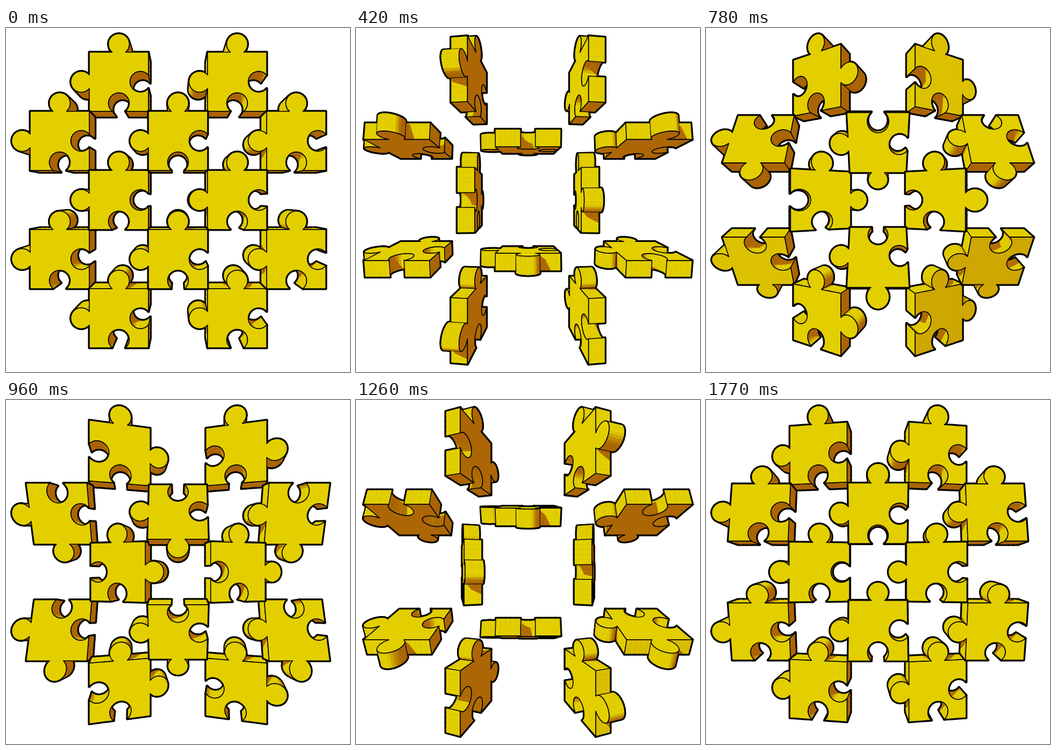
Recreate the animation shown at these times as an HTML page with a canvas. Size 640 by 640 pixels, loop 1.8 s.

```html
<!DOCTYPE html>
<html lang="en">
<head>
<meta charset="utf-8">
<title>Turning puzzle pieces</title>
<style>
html, body { margin: 0; width: 100%; height: 100%; overflow: hidden; background: #fff; }
canvas { display: block; width: 640px; height: 640px; }
</style>
</head>
<body>
<canvas id="stage" width="640" height="640"></canvas>
<script>
const ctx = document.getElementById('stage').getContext('2d');
const LOOP = 1800, STEP = 30;
const CENTER = 320, SPACING = 110;
const HALF = 55, DEPTH = 14.5;            // half side and half thickness
const KNOB = 19.5, KNOB_OUT = 15;         // radius and distance of knob centre from the edge
const FOCUS = 417, EYE = FOCUS + DEPTH;
const LIGHT = [-400, -400, 600];
const DARK = [172, 102, 6], BRIGHT = [227, 207, 0];

// Outline, clockwise from the top left corner: knobs on top and left, sockets right and bottom.
function buildOutline() {
  const points = [];
  const neck = Math.sqrt(KNOB ** 2 - KNOB_OUT ** 2);
  const sweep = Math.PI - Math.atan2(neck, KNOB_OUT);
  const straight = 5, arc = 24;
  [1, -1, -1, 1].forEach((sign, turns) => {
    const add = (u, v, corner) => {
      let x = u, y = -HALF - v;
      for (let i = 0; i < turns; i++) [x, y] = [-y, x];
      points.push({ x, y, corner });
    };
    for (let i = 0; i < straight; i++) add(-HALF + (HALF - neck) * i / straight, 0, i === 0);
    for (let i = 0; i < arc; i++) {
      const a = sweep * (2 * i / arc - 1);
      add(KNOB * Math.sin(a), sign * (KNOB_OUT + KNOB * Math.cos(a)), i === 0);
    }
    for (let i = 0; i < straight; i++) add(neck + (HALF - neck) * i / straight, 0, i === 0);
  });
  return points;
}

const outline = buildOutline();
const walls = outline.map((a, i) => {
  const b = outline[(i + 1) % outline.length];
  const dx = b.x - a.x, dy = b.y - a.y, len = Math.hypot(dx, dy);
  return { a, b, dx, dy, nx: dy / len, ny: -dx / len, mx: (a.x + b.x) / 2, my: (a.y + b.y) / 2 };
});

function buildPieces() {
  const list = [];
  for (let i = 0; i < 3; i++) {
    for (let j = 0; j < 2; j++) {
      const spin = (i + j) % 2 ? -1 : 1;
      const near = (j - 0.5) * 2 * SPACING, far = (i - 1) * 2 * SPACING;
      list.push({ x: near, y: far, upright: true, spin });
      list.push({ x: far, y: near, upright: false, spin });
    }
  }
  return list.sort((p, q) => Math.hypot(q.x, q.y) - Math.hypot(p.x, p.y));
}
const pieces = buildPieces();

const clamp = (v, lo, hi) => Math.min(hi, Math.max(lo, v));

function shade(dot) {
  const k = clamp(dot / 0.46, 0, 1) ** 1.6;
  return `rgb(${DARK.map((d, i) => Math.round(d + (BRIGHT[i] - d) * k))})`;
}

function trace(points) {
  ctx.beginPath();
  points.forEach(p => ctx.lineTo(p[0], p[1]));
  ctx.closePath();
}

function paint(points, color) {
  trace(points);
  ctx.fillStyle = ctx.strokeStyle = color;
  ctx.lineWidth = 0.6;
  ctx.fill();
  ctx.stroke();
}

function line(p, q) {
  ctx.beginPath();
  ctx.moveTo(p[0], p[1]);
  ctx.lineTo(q[0], q[1]);
  ctx.strokeStyle = '#000';
  ctx.lineWidth = 1.5;
  ctx.stroke();
}

// Distance along the flattened light ray to the first part of the outline it meets.
function rayHit(x, y, lx, ly) {
  let best = Infinity;
  for (const w of walls) {
    const det = lx * w.dy - ly * w.dx;
    if (Math.abs(det) < 1e-9) continue;
    const ex = w.a.x - x, ey = w.a.y - y;
    const s = (ex * w.dy - ey * w.dx) / det;
    const u = (ex * ly - ey * lx) / det;
    if (s > 0 && s < best && u >= 0 && u <= 1) best = s;
  }
  return best;
}

function drawPiece(piece, angle) {
  const c = Math.cos(angle), s = Math.sin(angle) * piece.spin;

  const project = (x, y, z) => {
    let wx = x, wy = y, wz;
    if (piece.upright) { wx = x * c + z * s; wz = z * c - x * s; }
    else { wy = y * c + z * s; wz = z * c - y * s; }
    const k = FOCUS / (EYE - wz);
    return [CENTER + (piece.x + wx) * k, CENTER + (piece.y + wy) * k];
  };
  const toLocal = (x, y, z) => {
    x -= piece.x;
    y -= piece.y;
    return piece.upright ? [x * c - z * s, y, x * s + z * c] : [x, y * c - z * s, y * s + z * c];
  };

  const eye = toLocal(0, 0, EYE);
  const ray = toLocal(...LIGHT);
  const size = Math.hypot(...ray);
  const [lx, ly, lz] = ray.map(v => v / size);

  const facing = w => (eye[0] - w.mx) * w.nx + (eye[1] - w.my) * w.ny > 0;
  const visible = walls.map(facing);
  const shown = walls
    .map((w, i) => ({
      w, i,
      range: Math.hypot(eye[0] - w.mx, eye[1] - w.my),
      quad: [project(w.a.x, w.a.y, DEPTH), project(w.b.x, w.b.y, DEPTH),
             project(w.b.x, w.b.y, -DEPTH), project(w.a.x, w.a.y, -DEPTH)]
    }))
    .filter(o => visible[o.i])
    .sort((p, q) => q.range - p.range);

  const side = eye[2] > DEPTH ? 1 : eye[2] < -DEPTH ? -1 : 0;
  const cap = side && outline.map(p => project(p.x, p.y, side * DEPTH));

  // Heavy contour lies beneath the fills, so only its outer half remains.
  ctx.strokeStyle = '#000';
  ctx.lineWidth = 5;
  for (const o of shown) { trace(o.quad); ctx.stroke(); }
  if (cap) { trace(cap); ctx.stroke(); }

  const shadowDepth = (p, w) => {
    const x = p.x + (w.mx - p.x) * 0.02 + w.nx * 0.05;
    const y = p.y + (w.my - p.y) * 0.02 + w.ny * 0.05;
    const hit = rayHit(x, y, lx, ly);
    const end = lz > 0 ? -DEPTH : DEPTH;
    return hit === Infinity ? end : clamp(-end - hit * lz, -DEPTH, DEPTH);
  };

  const count = walls.length;
  for (const { w, i, quad } of shown) {
    const dot = w.nx * lx + w.ny * ly;
    paint(quad, shade(dot));
    if (dot > 0) {
      const end = lz > 0 ? -DEPTH : DEPTH;
      const za = shadowDepth(w.a, w), zb = shadowDepth(w.b, w);
      if (Math.abs(za - end) + Math.abs(zb - end) > 0.01) {
        paint([project(w.a.x, w.a.y, za), project(w.b.x, w.b.y, zb),
               project(w.b.x, w.b.y, end), project(w.a.x, w.a.y, end)], shade(0));
      }
    }
    line(quad[0], quad[1]);
    line(quad[2], quad[3]);
    if (w.a.corner || !visible[(i + count - 1) % count]) line(quad[0], quad[3]);
    if (w.b.corner || !visible[(i + 1) % count]) line(quad[1], quad[2]);
  }

  if (cap) {
    trace(cap);
    ctx.fillStyle = shade(side * lz);
    ctx.fill();
    ctx.strokeStyle = '#000';
    ctx.lineWidth = 1.6;
    ctx.stroke();
  }
}

function draw(time) {
  const angle = Math.floor(time % LOOP / STEP) * STEP / LOOP * 2 * Math.PI;
  ctx.fillStyle = '#fff';
  ctx.fillRect(0, 0, 640, 640);
  ctx.lineJoin = ctx.lineCap = 'round';
  pieces.forEach(p => drawPiece(p, angle));
}

let start;
function tick(now) {
  start ??= now;
  draw(now - start);
  requestAnimationFrame(tick);
}
draw(0);
requestAnimationFrame(tick);
</script>
</body>
</html>
```
